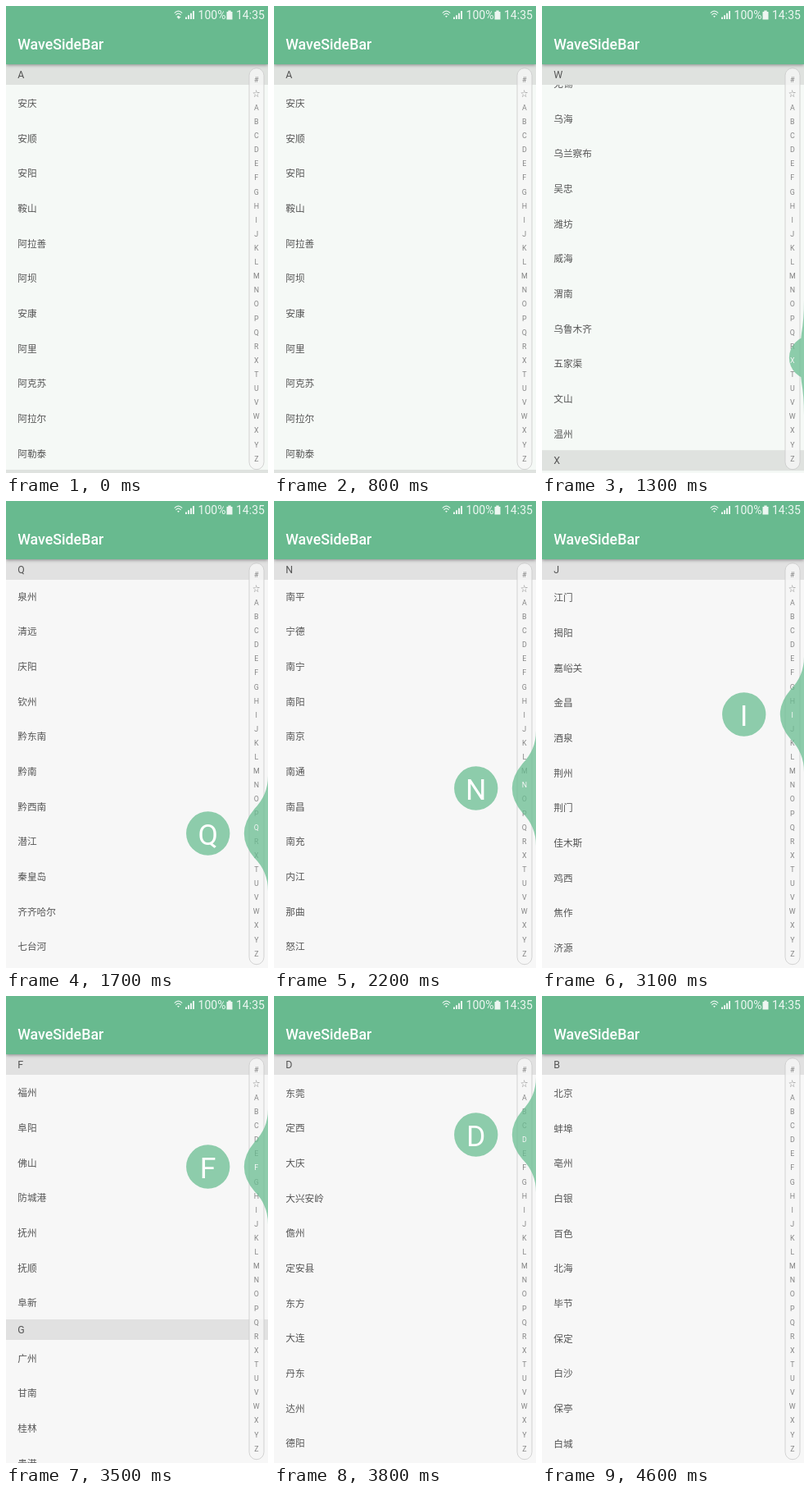
Write an HTML page that moves like this. It is 320 px wide and 569 px high and loops after 4.7 s.

```html
<!DOCTYPE html>
<html lang="zh-CN">
<head>
<meta charset="utf-8">
<title>WaveSideBar</title>
<style>
  html, body { margin: 0; width: 100%; height: 100%; overflow: hidden; }
  #stage { position: relative; width: 320px; height: 569px; overflow: hidden; background: #f7f7f7;
    color: #565656; font-family: Roboto, "Noto Sans CJK SC", sans-serif; --section: #e1e1e1; }
  #stage.tinted { background: #f5f9f6; --section: #dfe2df; }
  #view { position: absolute; top: 71.1px; left: 0; width: 320px; height: 498px; overflow: hidden; }
  .row, .section { box-sizing: border-box; padding-left: 14.2px; white-space: nowrap; }
  .row { height: 42.67px; line-height: 43.6px; font-size: 11.7px; font-family: "Noto Sans CJK SC", sans-serif; }
  .section { height: 24.9px; line-height: 26px; font-size: 12.4px; background: var(--section); }
  #sticky { position: absolute; top: 0; left: 0; width: 320px; }
  #bar { position: absolute; top: 0; left: 0; width: 320px; height: 71px; background: #68ba8f;
    box-shadow: 0 1px 4px rgba(0, 0, 0, .4); }
  svg { position: absolute; top: 0; left: 0; }
  text { font-family: Roboto, "Noto Sans CJK SC", sans-serif; }
  .index text { font-size: 8.9px; text-anchor: middle; fill: #858585; }
</style>
</head>
<body>
<div id="stage">
  <div id="view">
    <div id="list"></div>
    <div id="sticky" class="section"></div>
  </div>
  <svg width="320" height="569" class="index">
    <rect x="297" y="75.7" width="18" height="489" rx="9" fill="#f7f7f7" fill-opacity=".8" stroke="#c9c9c9" stroke-width=".8"/>
    <g id="letters"></g>
    <path id="wave" fill="#69be91" fill-opacity=".745"/>
    <text id="chosen" x="305.8" style="fill:#fff"></text>
    <text id="hint" x="246.7" style="fill:#fff;font-size:35.6px"></text>
  </svg>
  <div id="bar">
    <svg width="320" height="71" fill="#fff">
      <g fill="none" stroke="#fff" stroke-width="1.2" opacity=".85">
        <path d="M205.8 8.6Q210.5 3.8 215.2 8.6M207.4 10.8Q210.5 7.6 213.6 10.8"/>
      </g>
      <path d="M209.1 12.4Q210.5 11 211.9 12.4L210.5 14Z" opacity=".85"/>
      <path id="traffic" d="M208.3 13H213.7L211 16Z" opacity=".8"/>
      <g opacity=".88">
        <path d="M219 13.4h2V16h-2ZM222 11.2h2V16h-2ZM225 8.8h2V16h-2ZM228 6h2V16h-2Z"/>
        <path d="M269.5 7h1.8V5.6h3.4V7h1.8v9.4h-7Z"/>
        <text x="234.6" y="16.2" font-size="14">100%</text>
        <text x="281" y="16.2" font-size="14">14:35</text>
      </g>
      <text x="14.2" y="53.2" font-size="17.8" font-weight="500">WaveSideBar</text>
    </svg>
  </div>
</div>
<script>
const $ = id => document.getElementById(id);
const LOOP = 4700, STEP = 100;
const VIEW_H = 497.9, ROW_H = 42.67, SECTION_H = 24.9;
const INDEX = [..."#☆ABCDEFGHIJKLMNOPQRXTUVWXYZ"], INDEX_TOP = 89.5, INDEX_GAP = 17.11;
const WAVE_R = 23.3, BALL_R = 26.67, WIDTH = 320;

const cities = {
  A: "安庆 安顺 安阳 鞍山 阿拉善 阿坝 安康 阿里 阿克苏 阿拉尔 阿勒泰",
  B: "北京 蚌埠 亳州 白银 百色 北海 毕节 保定 白沙 保亭 白城 保山",
  C: "重庆 滁州 池州 潮州 崇左 承德 沧州 常德 长沙 郴州 常州 长春",
  D: "东莞 定西 大庆 大兴安岭 儋州 定安县 东方 大连 丹东 达州 德阳 大理",
  E: "恩施 鄂州 鄂尔多斯",
  F: "福州 阜阳 佛山 防城港 抚州 抚顺 阜新",
  G: "广州 甘南 桂林 贵港 贵阳 赣州 广元 广安 甘孜 固原 果洛 赣县",
  H: "合肥 淮南 淮北 黄山 惠州 河源 河池 贺州 邯郸 衡水 海口 鹤壁",
  J: "江门 揭阳 嘉峪关 金昌 酒泉 荆州 荆门 佳木斯 鸡西 焦作 济源 嘉兴",
  K: "开封 昆明 克拉玛依 喀什 克孜勒苏",
  L: "六安 龙岩 兰州 陇南 临夏 柳州 来宾 六盘水 廊坊 洛阳 漯河 乐东",
  M: "马鞍山 茂名 梅州 牡丹江 眉山 绵阳",
  N: "南平 宁德 南宁 南阳 南京 南通 南昌 南充 内江 那曲 怒江 宁波",
  P: "莆田 平凉 平顶山 濮阳 萍乡 盘锦 攀枝花 普洱",
  Q: "泉州 清远 庆阳 钦州 黔东南 黔南 黔西南 潜江 秦皇岛 齐齐哈尔 七台河 琼海",
  R: "日照 日喀则",
  S: "上海 宿州 三明 韶关 汕头 汕尾 深圳 三亚 石家庄 三门峡 商丘 绥化",
  W: "芜湖 武威 梧州 武汉 无锡 乌海 乌兰察布 吴忠 潍坊 威海 渭南 乌鲁木齐 五家渠 文山 温州",
  X: "宣城 厦门"
};

const offsets = {};
let height = 0;
for (const [letter, names] of Object.entries(cities)) {
  const rows = names.split(" ");
  offsets[letter] = height;
  height += SECTION_H + rows.length * ROW_H;
  $("list").innerHTML += `<div class="section">${letter}</div>` +
    rows.map(name => `<div class="row">${name}</div>`).join("");
}

const indexY = i => INDEX_TOP + i * INDEX_GAP;
$("letters").innerHTML = INDEX.map((c, i) =>
  `<text x="305.8" y="${indexY(i) + 3.2}">${c}</text>`).join("");

// Finger height over time
const finger = [[1300, 428.5], [1400, 428], [1700, 405], [2200, 350], [3100, 260], [3800, 169], [4200, 138]];

function fingerY(t) {
  for (let i = 1; i < finger.length; i++) {
    const [t0, y0] = finger[i - 1], [t1, y1] = finger[i];
    if (t <= t1) return y0 + (y1 - y0) * Math.max(0, (t - t0) / (t1 - t0));
  }
  return finger.at(-1)[1];
}

const ease = p => (1 - Math.cos(Math.PI * Math.min(1, Math.max(0, p)))) / 2;
const openRatio = t => ease((t - 1216) / 300) - ease((t - 4290) / 300);

function wavePath(cy, ratio) {
  const r = WAVE_R, bend = r * Math.SQRT1_2;
  const endX = WIDTH - bend * ratio, midX = WIDTH - 1.8 * r * ratio;
  const ballX = WIDTH + BALL_R - 2 * (r + BALL_R) * ratio;
  return `M${WIDTH} ${cy - 3 * r}Q${WIDTH} ${cy - 2 * r} ${endX} ${cy - 2 * r + bend}` +
    `Q${midX} ${cy} ${endX} ${cy + 2 * r - bend}Q${WIDTH} ${cy + 2 * r} ${WIDTH} ${cy + 3 * r}Z` +
    `M${ballX} ${cy - BALL_R}a${BALL_R} ${BALL_R} 0 0 0 0 ${2 * BALL_R}a${BALL_R} ${BALL_R} 0 0 0 0 ${-2 * BALL_R}Z`;
}

function showList(letter) {
  // Letters without cities keep the section reached before them
  const section = { I: "J", O: "P" }[letter] || letter;
  const fromBottom = section === "X";
  const scroll = fromBottom ? offsets.X + SECTION_H - VIEW_H : offsets[section];
  $("list").style.transform = `translateY(${-scroll}px)`;
  $("sticky").textContent = fromBottom ? "W" : section;
}

function render(t) {
  const touched = t >= 1300, pressed = touched && t < 4300;
  const y = fingerY(t), ratio = touched ? openRatio(t) : 0;
  const i = Math.round((y - INDEX_TOP) / INDEX_GAP), letter = INDEX[i];

  showList(touched ? letter : "A");
  $("stage").classList.toggle("tinted", t < 1500);
  $("traffic").style.display = t < 800 ? "" : "none";
  $("wave").setAttribute("d", ratio > .001 ? wavePath(y, ratio) : "");
  $("chosen").textContent = pressed ? letter : "";
  $("chosen").setAttribute("y", indexY(i) + 3.2);
  $("hint").textContent = pressed && ratio >= .9 ? letter : "";
  $("hint").setAttribute("y", y + 13.8);
}

const start = performance.now();
function tick() {
  const t = (performance.now() - start) % LOOP;
  render(Math.floor(t / STEP) * STEP);
  requestAnimationFrame(tick);
}
tick();
</script>
</body>
</html>
```
